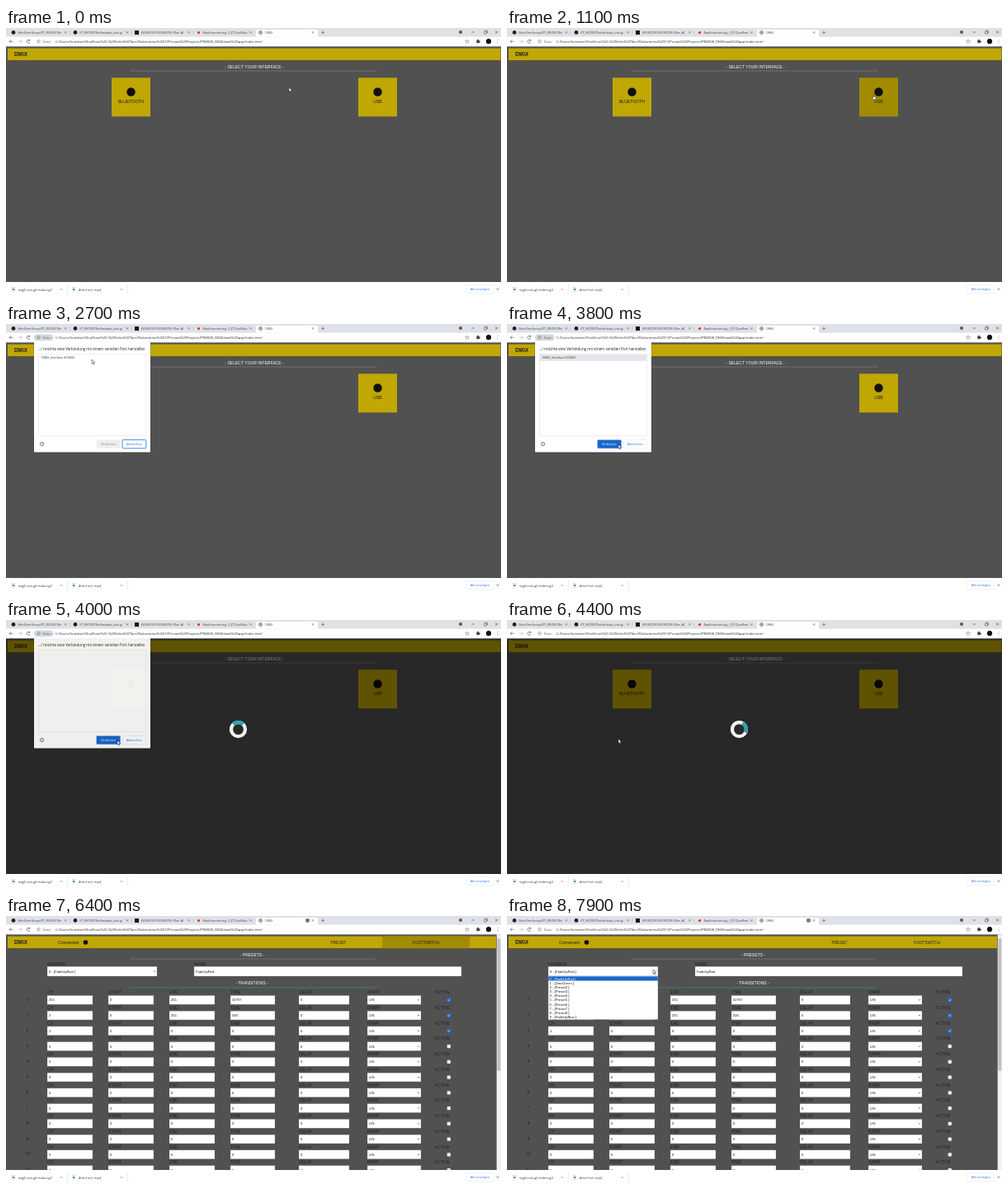
These frames come from a looping animation (600 px wide and 325 px high, 8 s). An HTML page:

```html
<!DOCTYPE html>
<html lang="de">
<head>
<meta charset="utf-8">
<title>DMiX</title>
<style>
  html, body { margin: 0; width: 100%; height: 100%; overflow: hidden; background: #505050; }
  svg { display: block; width: 100vw; height: 100vh; }
  text { white-space: pre; }
  .ui { font-family: "Open Sans", "Noto Sans", sans-serif; }
  .page { font-family: "Liberation Sans", Arial, sans-serif; }
</style>
</head>
<body>
<svg id="stage" viewBox="0 0 600 325" preserveAspectRatio="none"></svg>
<script>
const LOOP = 8000;
const GOLD = '#c0a704', GOLD_HOVER = '#a18b00', INK = '#222', BLUE = '#1a73e8';
const stage = document.getElementById('stage');

const attrs = o => Object.entries(o).map(([k, v]) => ` ${k}="${v}"`).join('');
const rect = (x, y, w, h, fill, o = {}) =>
  `<rect x="${x}" y="${y}" width="${w}" height="${h}" fill="${fill}"${attrs(o)}/>`;
const dot = (x, y, r, fill, o = {}) => `<circle cx="${x}" cy="${y}" r="${r}" fill="${fill}"${attrs(o)}/>`;
const line = (d, stroke, width = 0.6, o = {}) =>
  `<path d="${d}" fill="none" stroke="${stroke}" stroke-width="${width}"${attrs(o)}/>`;
const text = (x, y, size, str, fill = INK, o = {}) =>
  `<text x="${x}" y="${y}" font-size="${size}" fill="${fill}"${attrs(o)}>${str}</text>`;
const group = (body, o = {}) => `<g${attrs(o)}>${body}</g>`;
const MID = { 'text-anchor': 'middle' };
const cross = (x, y, r = 1.4, color = '#444') =>
  line(`M${x - r} ${y - r}l${2 * r} ${2 * r}m0 ${-2 * r}l${-2 * r} ${2 * r}`, color, 0.5);
const chevron = (x, y, w = 1.2, dir = 1, color = '#222') =>
  line(`M${x - w} ${y - dir * w / 2}l${w} ${dir * w}l${w} ${-dir * w}`, color, 0.6);

function tab(x, icon, title, i) {
  const clip = `tab${i}`;
  return icon + `<clipPath id="${clip}">${rect(x + 14, 0, 54, 11, '#000')}</clipPath>` +
    text(x + 14, 6.9, 3.75, title, '#3c4043', { 'clip-path': `url(#${clip})` }) +
    cross(x + 72, 5.4, 1.2);
}

function browserTop() {
  const tabs = [
    [0, dot(9, 5.4, 2.4, '#1b1f23'), 'VelmTarnGroup/VT_KVOR278x'],
    [75, dot(84, 5.4, 2.4, '#1b1f23'), 'VT_KVOR278x/desktop_tool.gi'],
    [149.5, rect(156, 3, 5, 5, '#111'), 'KVOR2781/KVOR2785 (Rev. A)'],
    [224.5, dot(233.5, 5.4, 1.5, '#e2231a'), 'Baufinanzierung | QT Quellkassen'],
    [300, dot(308.5, 5.4, 2, 'none', { stroke: '#555', 'stroke-width': 0.7 }) +
      line('M306.5 5.4h4M308.5 3.4v4', '#555', 0.5), 'DMiX']
  ];
  const url = 'C:/Users/lumeken/OneDrive%20-%20Velm%20Tarn/Dokumente%20(1)/Private%20Projects/PN0008_DMiX/web%20app/index.html';
  return rect(0, 0, 600, 11, '#dee1e6') + rect(0, 10.6, 600, 11.8, '#fff') +
    line('M301 10.8q2 0 2-2V4q0-2 2-2h71q2 0 2 2v4.8q0 2 2 2z', 'none', 0, { style: 'fill:#fff' }) +
    line('M77 3.5v4M152 3.5v4M227 3.5v4', '#999', 0.35) +
    tabs.map((t, i) => tab(...t, i)).join('') +
    line('M382 5.4h4M384 3.4v4', '#444', 0.5) +
    dot(551, 5, 2, '#444') + chevron(551, 5, 0.8, 1, '#fff') +
    line('M564.5 5h3.5', '#222', 0.5) +
    line('M579.5 4h3v3h-3zM580.5 4v-1h3v3h-1', '#222', 0.4) + cross(594.5, 5, 1.5, '#222') +
    line('M8.5 16.3h-4.4m1.9-1.9l-1.9 1.9l1.9 1.9', '#444') +
    line('M15 16.3h4.4m-1.9-1.9l1.9 1.9l-1.9 1.9', '#aaa') +
    line('M28.6 15a2 2 0 1 0 .4 2M28.9 13.7v1.7h-1.7', '#444') +
    rect(34, 12.4, 23.5, 7.8, '#d5d7da', { id: 'chip', rx: 3.9 }) +
    dot(39.5, 16.3, 1.8, 'none', { stroke: '#555', 'stroke-width': 0.45 }) +
    line('M39.5 16v1.2M39.5 15v.4', '#555', 0.45) +
    text(44.5, 17.9, 4.1, 'Datei', '#5f6368') +
    text(60, 17.9, 4.18, url, '#26282b') +
    line('M559 13.9l.7 1.6l1.7.1l-1.3 1.1l.4 1.7l-1.5-.9l-1.5.9l.4-1.7l-1.3-1.1l1.7-.1z', '#555', 0.4) +
    rect(570.3, 14.7, 3.6, 3.6, '#444', { rx: 0.5 }) + dot(572, 14.3, 0.8, '#444') + dot(574.2, 16.5, 0.8, '#444') +
    dot(585, 16.2, 3.1, '#111') +
    [14.4, 16.2, 18].map(y => dot(596, y, 0.45, '#444')).join('') +
    group(rect(363.4, 3.3, 4.2, 4.2, '#555', { rx: 0.5 }) + line('M364.5 4.6h2M364.5 6.1h2', '#fff', 0.4), { id: 'portMark' });
}

function downloads() {
  const file = (x, color) => rect(x - 1.6, 314.3, 3.4, 4.8, '#fff', { stroke: '#9bb', 'stroke-width': 0.4 }) +
    rect(x - 0.9, 316, 2, 2, color);
  return rect(0, 308, 600, 17, '#fff') +
    file(9, '#4285c8') + text(15, 318.6, 3.85, 'ezgif.com-gif-maker.gif', '#333') + chevron(67, 317, 1.3, -1, '#555') +
    file(82, '#2b8bd0') + text(88, 318.6, 3.85, 'Anruf mit .mp4', '#333') + chevron(140, 317, 1.3, -1, '#555') +
    line('M74.3 311v11.5M147.3 311v11.5', '#ccc', 0.4) +
    rect(558, 311.3, 33, 10.4, '#fff', { rx: 1.2, stroke: '#dadce0', 'stroke-width': 0.4 }) +
    text(574.5, 318.1, 3.75, 'Alle anzeigen', BLUE, MID) + cross(596, 316.7, 1.3);
}

function startPage() {
  const button = (x, label, id, r) => rect(x, 60.3, 47, 47, GOLD, { id }) +
    dot(x + 23.5, 77.5, r, '#111') + text(x + 23.5, 91, 5.1, label, '#1a1a1a', MID);
  return rect(0, 22, 600, 286, '#515151') + rect(2, 39, 597, 1, '#414141') + rect(2, 24.6, 597.5, 14.6, GOLD) +
    text(10, 34, 6.4, 'DMiX', INK, { 'font-weight': 'bold' }) +
    text(301, 48.7, 5.06, '- SELECT YOUR INTERFACE -', '#fff', MID) +
    line('M150 52h300', '#8f8f8f', 0.5) +
    button(128, 'BLUETOOTH', 'blue', 5.2) + button(427, 'USB', 'usb', 5.2);
}

const COLUMNS = [['CH', 50, 55], ['START', 124, 55], ['END', 198, 55], ['TIME', 272, 54], ['DELAY', 355, 61]];
const VALUES = [[255, 0, 255, 32767, 0], [2, 0, 255, 500, 0], [1, 0, 0, 0, 0]];
const field = (x, y, w, value, h = 10.8) =>
  rect(x, y, w, h, '#fff', { stroke: '#777', 'stroke-width': 0.3 }) + text(x + 2, y + h / 2 + 1.6, 4.15, value, '#111');
const select = (x, y, w, value, h) => field(x, y, w, value, h) + chevron(x + w - 3, y + (h || 10.8) / 2, 1.1);

function transition(i) {
  const y = 96.4 + 18.75 * i, on = i < 3, values = VALUES[i] || [0, 0, 0, 0, 0];
  const label = (x, str) => text(x, y - 2.2, 5.1, str);
  return text(26, y + 6.4, 5.1, i, INK, MID) +
    COLUMNS.map(([name, x, w], c) => label(x, name) + field(x, y, w, values[c])).join('') +
    label(438, 'RAMP') + select(438, y, 65, 'LIN') + label(519.6, 'ACTIVE') +
    rect(534.7, y + 3.3, 4.2, 4.2, on ? BLUE : '#fff', { rx: 0.6, stroke: on ? BLUE : '#777', 'stroke-width': 0.3 }) +
    (on ? line(`M535.6 ${y + 5.4}l.9 1l1.6-2`, '#fff', 0.6) : '');
}

function presetPage() {
  const names = ['FadeUpRed', 'DmcGreen', ...[2, 3, 4, 5, 6, 7, 8].map(n => 'Preset' + n), 'FadeUpBlue'];
  const list = rect(50, 73, 133, 52.6, '#fff', { stroke: '#777', 'stroke-width': 0.4 }) +
    rect(50.2, 73.3, 132.6, 5.2, '#1967d2') +
    names.map((n, i) => text(51.6, 77.5 + 5.17 * i, 4.15, `${i} - [${n} ]`, i ? '#111' : '#fff')).join('');
  return rect(0, 22, 600, 286, '#515151') + rect(2, 39, 592, 1, '#414141') + rect(2, 24.6, 592, 14.6, GOLD) +
    rect(350, 24.6, 106, 14.6, GOLD_HOVER, { id: 'preset' }) +
    rect(456, 24.6, 106, 14.6, GOLD_HOVER, { id: 'footswitch' }) +
    text(10, 34, 6.4, 'DMiX', INK, { 'font-weight': 'bold' }) +
    text(63, 33.8, 5.1, 'Connected:') + dot(96.5, 32, 2.8, '#111') +
    text(403, 33.8, 4.75, 'PRESET', INK, MID) + text(509, 33.8, 4.75, 'FOOTSWITCH', INK, MID) +
    text(298.5, 48.6, 4.95, '- PRESETS -', '#fff', MID) + line('M150 52h297', '#8f8f8f', 0.5) +
    text(50, 59.6, 5.1, 'NUMBER') + text(228, 59.6, 5.1, 'NAME') +
    select(50, 61.2, 133, '0 - [FadeUpRed ]', 11.8) + field(228, 61.2, 324, 'FadeUpRed', 11.8) +
    text(298, 83.2, 4.95, '- TRANSITIONS -', '#fff', MID) + line('M150 86.8h297', '#2a9a90', 0.6) +
    Array.from({ length: 12 }, (_, i) => transition(i)).join('') +
    rect(594.7, 22.3, 5.3, 286, '#f1f1f1') + rect(595.3, 27.6, 4.1, 160, '#c1c1c1') +
    group(list, { id: 'list' });
}

function dialog() {
  return rect(33.4, 22.8, 142.2, 134, '#000', { opacity: 0.18, rx: 2 }) +
    rect(34, 22, 141, 133.6, '#fff', { rx: 1.2 }) +
    text(39, 31.8, 4.45, '.../ möchte eine Verbindung mit einem seriellen Port herstellen', '#222') +
    rect(39.3, 36.2, 130.6, 99.3, '#fff', { stroke: '#d5d5d5', 'stroke-width': 0.4 }) +
    group(rect(39.6, 37, 130, 7.8, '#e3e6ea', { id: 'rowMark' }) +
      text(43, 42.4, 3.7, 'DMiX_Interface (COM4)', '#333'), { id: 'row' }) +
    dot(43.6, 145.6, 2.2, 'none', { stroke: '#333', 'stroke-width': 0.6 }) +
    text(43.6, 147, 3.6, '?', '#333', MID) +
    rect(109.6, 140.4, 29, 10.4, '#eee', { id: 'connect', rx: 1 }) +
    text(124.1, 147, 3.7, 'Verbinden', '#888', { id: 'connectText', ...MID }) +
    rect(141, 140.4, 28.8, 10.4, '#fff', { id: 'cancel', rx: 1, stroke: BLUE, 'stroke-width': 0.8 }) +
    text(155.4, 147, 3.7, 'Abbrechen', BLUE, MID);
}

const spinner = dot(281.5, 132.6, 8.5, 'none', { stroke: '#f3f3f3', 'stroke-width': 4.2 }) +
  line('M275.49 126.59a8.5 8.5 0 0 1 12.02 0', '#2aa4b5', 4.2, { id: 'arc' });
const arrow = line('M0 0v5.2l1.2-1.1l.9 2l.9-.4l-.9-1.9h1.6z', '#111', 0.45, { id: 'arrow', style: 'fill:#fff' });
const hand = line('M-.5 0q.5-.6 1 0v2l2.2.5q.5.3.3 1.2l-.5 2h-2.6l-1.7-2q0-.6.6-.6l.7.5z', '#111', 0.45, { id: 'hand', style: 'fill:#fff' });

stage.innerHTML =
  group(startPage(), { id: 'start', class: 'page' }) +
  group(rect(0, 22, 600, 286, '#000', { opacity: 0.5 }) + spinner, { id: 'busy' }) +
  group(presetPage(), { id: 'presets', class: 'page' }) +
  group(browserTop() + downloads(), { class: 'ui' }) +
  group(dialog(), { id: 'dialog', class: 'ui' }) +
  group(arrow + hand, { id: 'cursor' });

const el = {};
stage.querySelectorAll('[id]').forEach(node => { el[node.id] = node; });
const set = (id, o) => Object.entries(o).forEach(([k, v]) => el[id].setAttribute(k, v));
const show = (id, on) => set(id, { display: on ? 'inline' : 'none' });
const within = (t, a, b) => t >= a && t < b;
const ramp = (t, a, b) => Math.min(1, Math.max(0, (t - a) / (b - a)));
const ease = p => p * p * (3 - 2 * p);

// time, x, y of the pointer tip
const PATH = [
  [200, 343, 72], [1300, 454, 82], [1900, 454, 82], [2600, 104, 43], [2950, 104, 43],
  [3600, 135, 146], [4000, 135, 146], [4500, 135, 144], [4800, 135, 144],
  [5600, 410, 32], [5800, 410, 32], [6200, 507, 32], [6500, 507, 32], [7300, 177, 65]
];

function pointer(t) {
  const i = PATH.findIndex(k => k[0] > t);
  if (i === 0) return PATH[0].slice(1);
  if (i < 0) return PATH[PATH.length - 1].slice(1);
  const [a, b] = [PATH[i - 1], PATH[i]], p = ease(ramp(t, a[0], b[0]));
  return [a[1] + (b[1] - a[1]) * p, a[2] + (b[2] - a[2]) * p];
}

function update(t) {
  const [x, y] = pointer(t);
  const loaded = t >= 4500, picked = t >= 2900;
  const inside = (x0, x1, y0, y1) => x >= x0 && x < x1 && y >= y0 && y < y1;
  const opening = t < 1700 ? 0.2 * ramp(t, 1600, 1700) : 0.2 + 0.8 * ramp(t, 1700, 1850);
  const closing = t < 4000 ? 1 - 0.07 * ramp(t, 3900, 4000) : 0.93 * (1 - ramp(t, 4000, 4180));
  const scale = 1 - 0.054 * (1 - opening);
  const overUsb = !loaded && inside(427, 474, 60, 107) && t < 2500;
  const overPreset = loaded && inside(350, 456, 24, 39), overFoot = loaded && inside(456, 562, 24, 39);

  show('start', !loaded);
  show('presets', loaded);
  show('portMark', loaded);
  show('chip', within(t, 1600, 4200));
  set('usb', { fill: overUsb ? GOLD_HOVER : GOLD });
  show('preset', overPreset);
  show('footswitch', overFoot);
  show('list', t >= 7600);

  show('busy', within(t, 3900, 4500));
  set('arc', { transform: `rotate(${(t - 4000) * 0.18} 281.5 132.6)` });

  show('dialog', within(t, 1600, 4180));
  set('dialog', {
    opacity: opening * closing,
    transform: `translate(104.5 89) scale(${scale}) translate(-104.5 -89)`
  });
  show('row', t < 3900);
  show('rowMark', picked);
  set('connect', { fill: picked ? '#1a66cc' : '#eee' });
  set('connectText', { fill: picked ? '#fff' : '#888' });
  set('cancel', { stroke: picked ? '#dadce0' : BLUE, 'stroke-width': picked ? 0.4 : 0.8 });

  const pointing = overUsb || overPreset || overFoot;
  show('cursor', !within(t, 6300, 6500));
  show('hand', pointing);
  show('arrow', !pointing);
  set('cursor', { transform: `translate(${x} ${y})` });
}

const begin = performance.now();
function tick() {
  const t = (performance.now() - begin) % LOOP;
  update(Math.floor(t / 100) * 100);
  requestAnimationFrame(tick);
}
tick();
</script>
</body>
</html>
```
